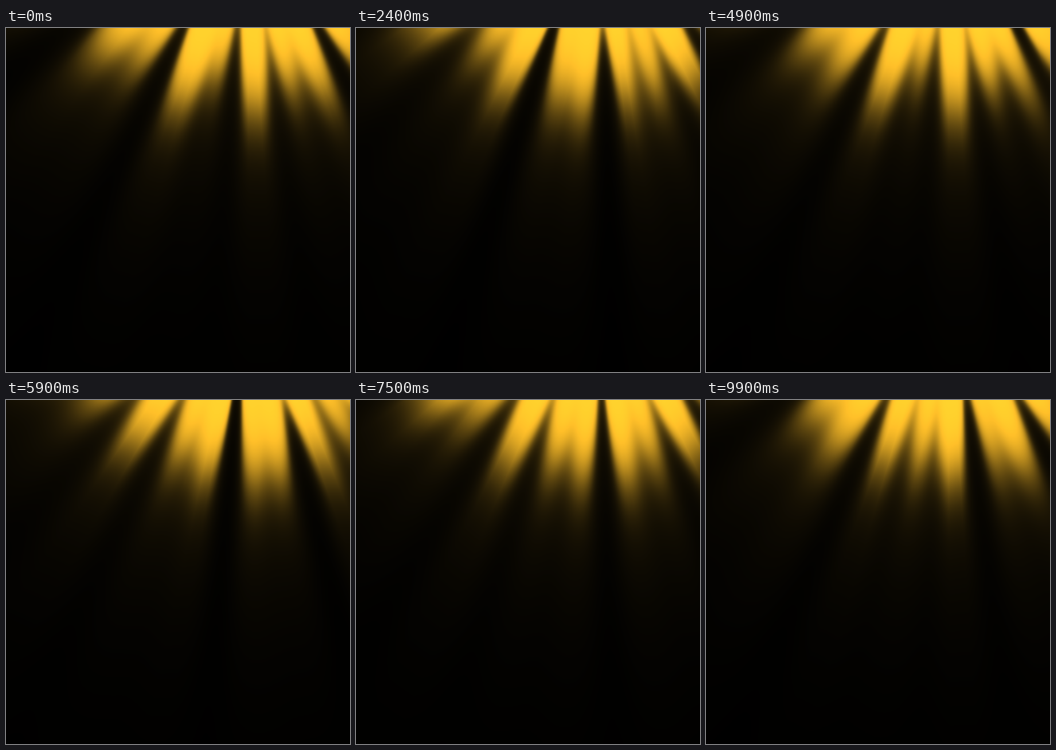
Recreate the animation shown at these times as an HTML page with a canvas. Size 600 by 600 pixels, loop 10000 ms.

```html
<!DOCTYPE html>
<html lang="en">
<head>
<meta charset="utf-8">
<title>Golden light rays</title>
<style>
  html, body { margin: 0; width: 100%; height: 100%; overflow: hidden; background: #000; }
  canvas { display: block; width: 100%; height: 100%; }
</style>
</head>
<body>
<canvas id="stage" width="600" height="600"></canvas>
<script>
const SIZE = 600, LOOP = 10000, STEP = 100;
const ctx = document.getElementById('stage').getContext('2d');
const image = ctx.createImageData(SIZE, SIZE);
const pixels = new Uint32Array(image.data.buffer);

// Two off-stage lights; each sums two waves running over the ray angle.
const lights = [
  { x: 420, y: -240, ref: [0.9933, -0.1152], a: 36.2214, b: 21.11349, phase: 4.47, rate: 1.2566 },
  { x: 480, y: -360, ref: [0.9722, 0.2343], a: 22.3991, b: 18.0234, phase: 4.54, rate: 0.9215 }
];

// How far a ray of a given strength shines, indexed by strength * 1000.
const reach = Float32Array.from({ length: 1400 }, (_, i) =>
  450 - 205 * Math.exp((0.4 - i / 1000) / 0.3));

// Glow by depth inside the ray's reach: a soft edge plus a long faint tail.
const DEPTH_MIN = -900, DEPTH_MAX = 460, FINE = 4;
const glow = Uint32Array.from({ length: (DEPTH_MAX - DEPTH_MIN) * FINE }, (_, i) => {
  const d = i / FINE + DEPTH_MIN;
  const v = 1 / (1 + Math.exp((45 - d) / 28)) + 0.11 * Math.exp(Math.min(d, 0) / 150);
  const level = k => Math.min(255, Math.round(255 * k * v));
  return (255 << 24 | level(0.16) << 16 | level(0.75) << 8 | level(1)) >>> 0;
});

// Splits each wave sum into the parts that scale with cos and sin of the phase.
function buildLight(light) {
  const [c, s, dist] = [0, 1, 2].map(() => new Float32Array(SIZE * SIZE));
  for (let y = 0, i = 0; y < SIZE; y++) {
    for (let x = 0; x < SIZE; x++, i++) {
      const dx = x - light.x, dy = y - light.y;
      dist[i] = Math.hypot(dx, dy);
      const u = (dx * light.ref[0] + dy * light.ref[1]) / dist[i];
      const a = u * light.a, b = u * light.b;
      c[i] = 0.15 * Math.sin(a) + 0.2 * Math.cos(b);
      s[i] = 0.15 * Math.cos(a) + 0.2 * Math.sin(b);
    }
  }
  Object.assign(light, { c, s, dist });
}

lights.forEach(buildLight);

function draw(sec) {
  const [p, q] = lights;
  const pa = p.phase + p.rate * sec, qa = q.phase + q.rate * sec;
  const pc = Math.cos(pa), ps = Math.sin(pa);
  const qc = Math.cos(qa), qs = Math.sin(qa);
  for (let i = 0; i < pixels.length; i++) {
    const s1 = Math.min(1, 0.75 + p.c[i] * pc + p.s[i] * ps);
    const s2 = Math.min(1, 0.75 + q.c[i] * qc + q.s[i] * qs);
    const strength = s1 + 0.4 * (s2 - 0.75);
    const depth = reach[strength * 1000 | 0] - p.dist[i];
    pixels[i] = glow[(depth - DEPTH_MIN) * FINE | 0];
  }
  ctx.putImageData(image, 0, 0);
}

const start = performance.now();
let shown = -1;

function tick() {
  const step = Math.floor(((performance.now() - start) % LOOP) / STEP);
  if (step !== shown) {
    shown = step;
    draw(step * STEP / 1000);
  }
  requestAnimationFrame(tick);
}
tick();
</script>
</body>
</html>
```
